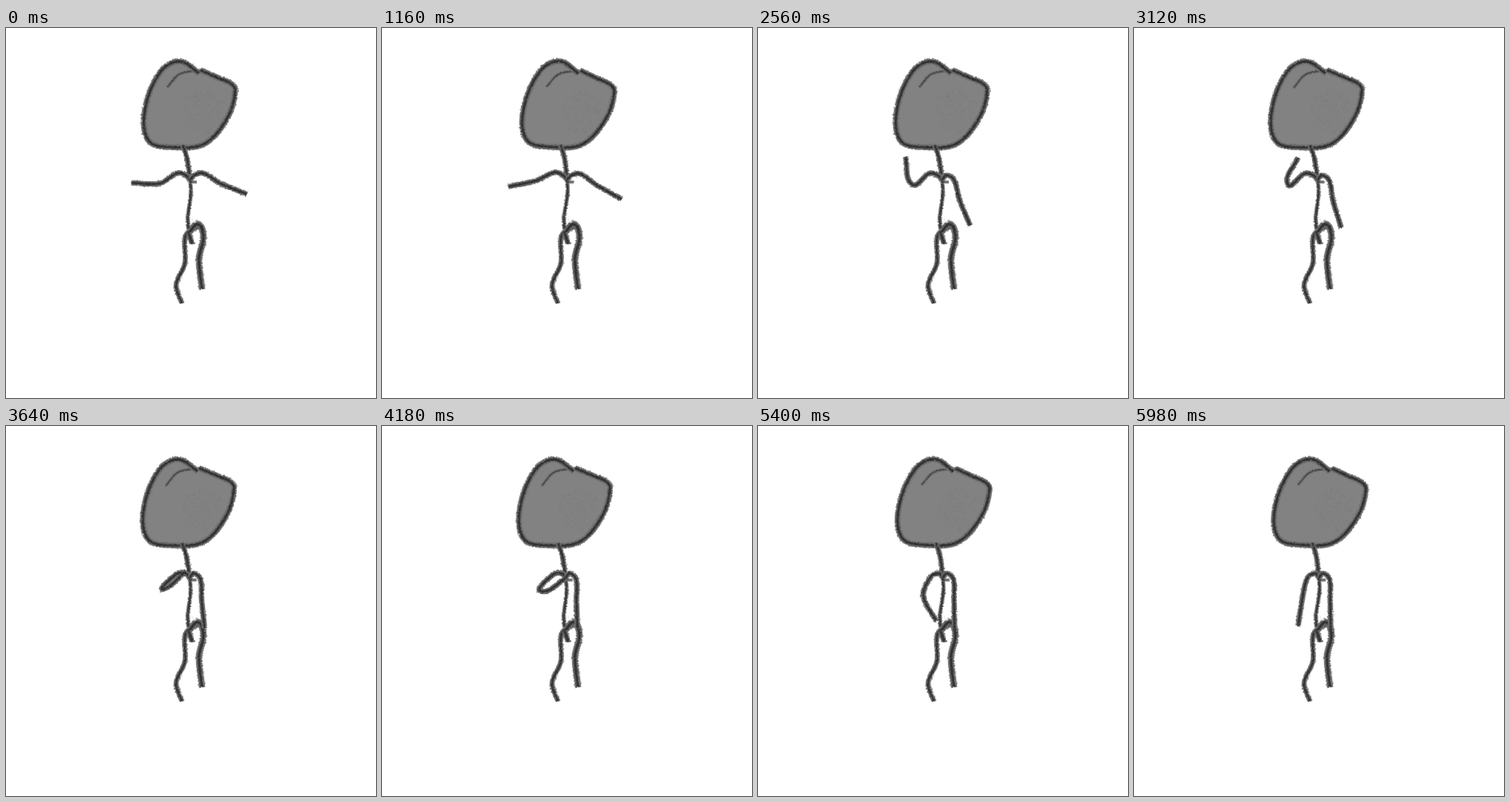
An HTML page that plays this animation: 500 px wide and 500 px high, repeating every 6 s.

```html
<!DOCTYPE html>
<html lang="en">
<head>
<meta charset="utf-8">
<title>Stick figure</title>
<style>
  html, body { margin: 0; width: 100%; height: 100%; overflow: hidden; background: #fff; }
  svg { display: block; width: 100vw; height: 100vh; }
</style>
</head>
<body>
<svg viewBox="0 0 500 500">
  <defs>
    <filter id="rough" filterUnits="userSpaceOnUse" x="0" y="0" width="500" height="500" color-interpolation-filters="sRGB">
      <feTurbulence type="fractalNoise" baseFrequency="0.45" numOctaves="2" seed="4" result="n"/>
      <feDisplacementMap in="SourceGraphic" in2="n" scale="3" xChannelSelector="R" yChannelSelector="G"/>
    </filter>
  </defs>
  <g id="figure" filter="url(#rough)" transform="translate(0.8 1.1)" fill="none" stroke-linejoin="round"></g>
</svg>
<script>
const LOOP = 6000;
const RAD = Math.PI / 180;
const HIP = [246, 264];
const UPPER = 37, FORE = 38.5;

// Angles in degrees, clockwise from the right; arms are [upper, fore]
const POSES = [
  { t: 0, lean: 0, left: [163, 181], right: [17, 22] },
  { t: 1160, lean: 1.35, left: [169, 168], right: [21, 29] },
  { t: 2100, lean: 1.2, left: [160, 176], right: [50, 55] },
  { t: 3120, lean: -0.55, left: [161, 291], right: [66, 73] },
  { t: 4180, lean: -0.5, left: [139, 332], right: [76, 88] },
  { t: 4900, lean: 0.55, left: [142, 333], right: [75, 89] },
  { t: 5980, lean: 1.15, left: [117, 459], right: [75, 89] }
];

const HEAD = [[260, 60], [234, 44], [208, 58], [187, 109], [192, 151], [225, 160],
  [268, 155], [299, 119], [309, 83], [303, 74], [285, 66], [262, 56]];
const CREASE = [[264, 56], [234, 61], [217, 79]];
const NECK = [[238, 157], [244, 176], [248, 206]];
const SPINE = [[248, 204], [249, 222], [245, 255], [246, 273], [251, 291]];
const LEFT_LEG = [[259, 267], [242, 279], [241, 317], [229, 346], [237, 371]];
const RIGHT_LEG = [[247, 275], [259, 264], [266, 282], [260, 310], [264, 352]];
const CHEST = [248, 204];

const figure = document.getElementById("figure");

function add(tag, attrs, parent = figure) {
  const el = document.createElementNS("http://www.w3.org/2000/svg", tag);
  for (const k in attrs) el.setAttribute(k, attrs[k]);
  return parent.appendChild(el);
}

const polar = ([x, y], r, deg) => [x + r * Math.cos(deg * RAD), y + r * Math.sin(deg * RAD)];

// Smooth curve through points, handles a third of each segment long
function curve(pts) {
  const dir = pts.map((p, i) => {
    const a = pts[Math.max(i - 1, 0)], b = pts[Math.min(i + 1, pts.length - 1)];
    return Math.atan2(b[1] - a[1], b[0] - a[0]) / RAD;
  });
  let d = "M" + pts[0];
  for (let i = 1; i < pts.length; i++) {
    const a = pts[i - 1], b = pts[i];
    const h = Math.hypot(b[0] - a[0], b[1] - a[1]) / 3;
    d += `C${polar(a, h, dir[i - 1])} ${polar(b, -h, dir[i])} ${b}`;
  }
  return d;
}

// Charcoal line: grey rim, darker towards the core
function charcoal(width, parent, opacity = 1) {
  const g = add("g", { opacity }, parent);
  const layers = [["#727272", 1], ["#575757", 0.6], ["#303030", 0.32]].map(([stroke, k]) =>
    add("path", { stroke, "stroke-width": width * k }, g));
  return pts => layers.forEach(p => p.setAttribute("d", curve(pts)));
}

// Seeded specks, denser towards the right side of the head
function grain(count) {
  let seed = 71, d = "";
  const rnd = () => (seed = seed * 16807 % 2147483647) / 2147483647;
  while (count--) {
    const [x, y] = polar([268, 112], 1, rnd() * 360);
    const r = Math.sqrt(rnd()) * 30;
    d += `M${268 + (x - 268) * r} ${112 + (y - 112) * r}h1.2`;
  }
  return d;
}

const head = add("g", {});
add("path", { d: curve(HEAD) + "Z", fill: "#828282" }, head);
add("path", { d: grain(220), stroke: "#707272", opacity: 0.45 }, head);
charcoal(4.5, head, 0.75)(CREASE);
charcoal(8, head)(HEAD);

const spine = charcoal(5.4);
const neck = charcoal(7);
charcoal(6.8)(LEFT_LEG);
charcoal(8.8)(RIGHT_LEG);
charcoal(7.5)([[246, 276], [251, 291]]);
const collar = charcoal(4.5, figure, 0.75);
const leftArm = charcoal(7.4);
const rightArm = charcoal(7.4);
add("path", { d: "M247 253L255 262", stroke: "#eee", "stroke-width": 1.6 });

// Shoulder rises from the chest, then two bones; side is -1 or 1
function arm(chest, side, [upper, fore]) {
  const shoulder = [chest[0] + side * 5.5, chest[1] - 6];
  const bend = polar(shoulder, 12, upper - side * 32);
  const elbow = polar(shoulder, UPPER, upper);
  return [chest, shoulder, bend, elbow, polar(elbow, FORE, fore)];
}

function draw(t) {
  let i = 0;
  while (i < POSES.length - 2 && t >= POSES[i + 1].t) i++;
  const a = POSES[i], b = POSES[i + 1];
  const k = Math.min((t - a.t) / (b.t - a.t), 1);
  const ease = 1 - (1 - k) ** 2;
  const mix = (p, q) => p + (q - p) * ease;
  const mixArm = side => a[side].map((v, n) => mix(v, b[side][n]));

  const lean = mix(a.lean, b.lean);
  // Everything above the hip turns with the body
  const sway = ([x, y]) => {
    if (y > HIP[1]) return [x, y];
    const dx = x - HIP[0], dy = y - HIP[1];
    return polar(HIP, Math.hypot(dx, dy), Math.atan2(dy, dx) / RAD + lean);
  };
  const chest = sway(CHEST);
  head.setAttribute("transform", `rotate(${lean} ${HIP})`);
  neck(NECK.map(sway));
  spine(SPINE.map(sway));
  collar([[chest[0], chest[1] + 3], [chest[0] + 9, chest[1] + 3]]);
  leftArm(arm(chest, -1, mixArm("left")));
  rightArm(arm(chest, 1, mixArm("right")));
}

const start = performance.now();
function tick() {
  draw((performance.now() - start) % LOOP);
  requestAnimationFrame(tick);
}
tick();
</script>
</body>
</html>
```
